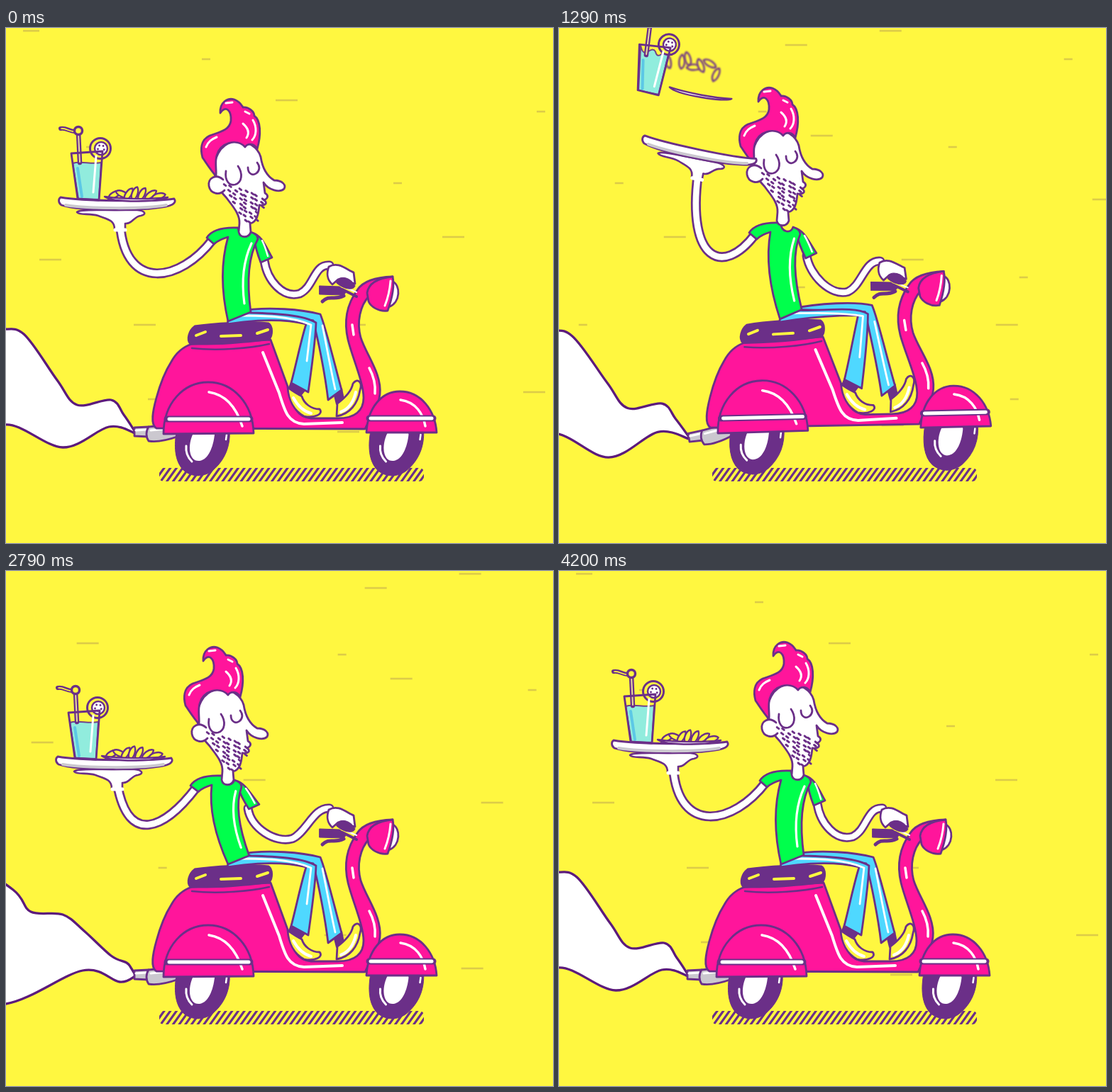
An HTML page with a canvas that plays this animation: 771x727 px, repeating every 4.23 s.

```html
<!DOCTYPE html>
<html lang="en">
<head>
<meta charset="utf-8">
<title>Scooter delivery</title>
<style>
html, body { margin: 0; width: 100%; height: 100%; overflow: hidden; background: #fff740; }
canvas { display: block; }
</style>
</head>
<body>
<canvas id="c" width="771" height="727"></canvas>
<script>
const ctx = document.getElementById('c').getContext('2d');
const YELLOW = '#fff740', INK = '#6b2f88', PINK = '#ff159b', GREEN = '#00ff4c',
  BLUE = '#4fd8ff', DRINK = '#86ecef', GREY = '#cbc8cf', WHITE = '#fff';
const STEP = 30, FRAMES = 141, RAD = Math.PI / 180;

// Traces an absolute M/L/C/Z path, optionally bending its points.
function trace(d, map) {
  const tok = d.match(/[MLCZ]|-?[\d.]+/g);
  let i = 0, cmd = '';
  const pt = () => {
    const x = +tok[i++], y = +tok[i++];
    return map ? map(x, y) : [x, y];
  };
  ctx.beginPath();
  while (i < tok.length) {
    if (/[A-Z]/.test(tok[i])) cmd = tok[i++];
    if (cmd === 'M') ctx.moveTo(...pt());
    else if (cmd === 'L') ctx.lineTo(...pt());
    else if (cmd === 'C') ctx.bezierCurveTo(...pt(), ...pt(), ...pt());
    else ctx.closePath();
  }
}
function line(d, color, w, map) {
  trace(d, map);
  ctx.strokeStyle = color;
  ctx.lineWidth = w;
  ctx.stroke();
}
function shape(d, fill, w = 2.8, map) {
  trace(d, map);
  ctx.fillStyle = fill;
  ctx.fill();
  if (w) { ctx.strokeStyle = INK; ctx.lineWidth = w; ctx.stroke(); }
}
function tube(d, wide, thin, map) {
  line(d, INK, wide, map);
  line(d, WHITE, thin, map);
}
function disc(x, y, r, fill, w = 2.8) {
  ctx.beginPath();
  ctx.arc(x, y, r, 0, 7);
  ctx.fillStyle = fill;
  ctx.fill();
  ctx.strokeStyle = INK;
  ctx.lineWidth = w;
  ctx.stroke();
}
function group(fn) { ctx.save(); fn(); ctx.restore(); }
function place(px, py, dx, dy, deg) {
  ctx.translate(px + dx, py + dy);
  ctx.rotate(deg * RAD);
  ctx.translate(-px, -py);
}

// Smooth value of a track of [frame, ...values] rows.
function at(keys, f) {
  const n = keys.length - 1;
  if (f <= keys[0][0]) return keys[0].slice(1);
  if (f >= keys[n][0]) return keys[n].slice(1);
  let i = 0;
  while (keys[i + 1][0] <= f) i++;
  const a = keys[i], b = keys[i + 1], p = keys[Math.max(0, i - 1)], q = keys[Math.min(n, i + 2)];
  const h = b[0] - a[0], u = (f - a[0]) / h, v = 1 - u;
  return a.slice(1).map((y, j) => {
    const k = j + 1;
    const m0 = i ? (b[k] - p[k]) / (b[0] - p[0]) : 0;
    const m1 = i + 1 < n ? (q[k] - a[k]) / (q[0] - a[0]) : 0;
    return y * (1 + 2 * u) * v * v + b[k] * (3 - 2 * u) * u * u + h * u * v * (m0 * v - m1 * u);
  });
}
function blur(keys, f) {
  const a = at(keys, f), b = at(keys, f - 1);
  const r = Math.min(1.5, (Math.hypot(a[0] - b[0], a[1] - b[1]) - 3) * .3);
  if (r > .2) ctx.filter = `blur(${r.toFixed(2)}px)`;
}

const RIDE = [[26,0,0],[29,-3,0],[32,-1,-2],[35,1.2,-11],[39,-.6,-5],[43,-1.2,-1],[47,-.3,0],[51,0,0]];
const HEAD = [[26,0,0],[30,3,5],[36,-6,8],[43,-21,-16],[48,-20,-24],[55,-4,-4],[61,2.5,6],[68,-2,2],[80,-16,2],[93,-24,7],[102,-10,3],[110,0,0]];
const CHEST = [[26,0,0],[30,2,4],[36,-5,6],[43,-15,-7],[48,-15,-11],[55,-3,-2],[61,3.5,4],[68,-2,3],[80,-16,3],[93,-23,7],[102,-9,3],[110,0,0]];
const TRAY = [[26,0,0,0],[31,0,12,-2],[37,24,-40,8],[43,41,-72,11],[49,46,-84,8],[55,47,-76,4],[61,46,-65,2.5],[66,44,-48,1],[74,30,-30,0],[84,4,10,0],[93,-4,23,0],[102,-2,10,0],[110,0,0,0]];
const GLASS = [[32,0,0,0],[38,-20,-50,2],[43,-33,-71,-1],[48,-33,-85,-6],[55,-16,-45,2],[61,-3,2,3],[65,0,0,0]];
const PLATE = [[32,0,0,0],[38,-14,-55,4],[43,-26,-80,-1],[49,-26,-95,-8],[55,-18,-50,-16],[61,-7,-7,-13],[65,0,0,0]];

// Wind streaks: x, y, width
const STREAKS = [[919,4,31],[786,24,31],[276,44,12],[380,102,31],[748,118,12],[822,152,31],[113,168,12],
  [546,219,12],[316,242,31],[615,295,31],[47,327,31],[213,352,12],[802,366,12],[180,419,31],[495,419,12],
  [729,514,31],[200,524,12],[922,561,31],[467,570,31]];
function streaks(f) {
  const wrap = 903, left = 24;
  group(() => {
    ctx.beginPath();
    ctx.rect(left, 0, 771, 727);
    ctx.clip();
    ctx.fillStyle = '#dccb48';
    for (const [x0, y, w] of STREAKS) {
      const x = x0 - 31.15 * (f % 28) - left + w;
      ctx.fillRect((x % wrap + wrap) % wrap + left - w, y - 1.3, w, 2.6);
    }
  });
}

// Smoke features travel left with age.
const RISE = [[-3,179,566],[0,176,560],[5,166,546],[10,143,533],[14,110,508],[17,92,497],[19,72,497],[24,45,470],[28,10,450],[33,-60,420]];
const CREST = [[-3,177,563],[0,170,553],[3,152,545],[5,148,525],[10,120,515],[14,80,485],[17,60,458],[19,25,432],[24,-12,412],[28,-70,400]];
const DIP = [[-3,174,558],[0,148,543],[3,118,537],[5,100,532],[10,75,511],[14,35,481],[17,28,457],[19,-10,425],[24,-60,400]];
const NOTCH = [[10,178,571],[12,172,570],[14,145,563],[19,115,562],[23,108,564],[26,30,577],[28,-2,560],[34,-60,590]];
const BULGE = [[6,178,573],[9,160,580],[12,100,589],[14,80,592],[15,68,598],[19,45,602],[23,0,611],[28,-60,612]];
function spline(p) {
  for (let i = 0; i < p.length - 1; i++) {
    const a = p[Math.max(0, i - 1)], b = p[i], c = p[i + 1], d = p[Math.min(p.length - 1, i + 2)];
    ctx.bezierCurveTo(b[0] + (c[0] - a[0]) / 6, b[1] + (c[1] - a[1]) / 6,
      c[0] - (d[0] - b[0]) / 6, c[1] - (d[1] - b[1]) / 6, c[0], c[1]);
  }
}
function smoke(f, dx, dy) {
  const ph = f % 14, u = (ph + 8) % 14 - 3;
  const top = [[182, 570]], low = [[182, 572]];
  for (let k = 0; k < 3; k++) {
    for (const key of [RISE, CREST, DIP]) {
      const age = u + 14 * k;
      if (age <= key[key.length - 1][0]) top.push(at(key, age));
    }
    for (const key of [NOTCH, BULGE]) {
      const age = ph + 14 * k;
      if (age >= key[0][0] && age <= key[key.length - 1][0]) low.push(at(key, age));
    }
  }
  top.push([-110, 395]);
  low.push([-110, 600]);
  low.reverse();
  group(() => {
    ctx.translate(dx, dy);
    ctx.beginPath();
    ctx.moveTo(...low[0]);
    spline(low);
    ctx.lineTo(...top[0]);
    spline(top);
    ctx.fillStyle = WHITE;
    ctx.fill();
    ctx.strokeStyle = '#5c1b7c';
    ctx.lineWidth = 3.3;
    ctx.stroke();
  });
}

function ground() {
  group(() => {
    ctx.beginPath();
    ctx.roundRect(216, 621, 373, 19, 6);
    ctx.clip();
    for (let x = 200; x < 590; x += 8.7) line(`M${x} 641L${x + 15} 620`, INK, 3.2);
  });
}

function wheel(dx) {
  group(() => {
    ctx.translate(dx, 0);
    shape('M241 566C236 590 238 612 250 624C262 635 280 634 292 624C307 611 317 592 315 566Z', INK, 1);
    shape('M264 572C274 562 294 566 294 574C292 592 285 609 273 611C258 613 255 590 264 572Z', WHITE, 0);
    line('M254 590C253 599 256 606 262 612', WHITE, 3);
    line('M311 574L310 581', WHITE, 2.5);
  });
}

function scooter(rot) {
  group(() => {
    place(242, 574, 0, 0, Math.max(-9, rot * 6.5));
    shape('M181 564L201 563L201 577L181 576Z', GREY);
    line('M183 568L199 567', WHITE, 3);
    shape('M201 563L230 560L244 576C230 581 212 585 201 583C197 577 197 569 201 563Z', GREY);
    line('M204 568L224 566', WHITE, 3);
  });
  wheel(0);
  wheel(273.5);
  shape('M545 358C556 362 557 388 539 394Z', WHITE);
  shape('M212 565C203 560 207 540 212 522C218 500 226 482 233 471C240 458 250 450 262 446L373 440L397 506C404 535 410 549 430 551L468 551C492 551 504 540 504 522C504 500 488 465 482 440C475 410 482 388 495 370C503 357 520 352 545 351L512 378C499 392 494 415 500 437C508 462 530 488 527 517C526 527 522 535 518 541L506 566Z', PINK);
  line('M262 452C300 456 345 452 371 446', INK, 2.5);
  line('M362 458L385 515C393 542 398 558 420 559L474 557', WHITE, 4);
  line('M488 419L490 433M512 480C519 493 521 505 520 516', WHITE, 3.5);
  shape('M222 573C222 530 250 500 285 500C320 500 348 530 349 572Z', PINK);
  line('M286 514C312 518 326 540 333 562', WHITE, 3.5);
  line('M227 552L344 552', INK, 9);
  line('M230 552L342 552', WHITE, 5);
  shape('M508 571C510 535 530 513 555 513C585 513 605 540 607 571Z', PINK);
  line('M556 525C578 528 588 545 591 562', WHITE, 3.5);
  line('M512 551L602 551', INK, 9);
  line('M514 551L600 551', WHITE, 5);
  shape('M266 421C290 417 345 414 370 417C376 421 376 434 371 439C345 444 290 447 260 446C254 440 258 427 266 421Z', INK);
  line('M268 434L281 429M303 435L331 434M354 431L369 426', YELLOW, 4);
  shape('M509 374C511 360 525 353 545 351C548 365 543 385 538 399C525 401 514 393 511 386Z', PINK);
  line('M542 357C541 370 538 382 534 392', WHITE, 3);
}

function legs(lift) {
  const map = (x, y) => [x, y < 425 && x > 400 ? y - lift : y];
  shape('M463 519L473 509L476 524L466 531Z', INK, 2);
  shape('M466 548L467 530C478 522 487 512 489 502C495 493 503 500 499 511C496 530 485 545 466 548Z', YELLOW);
  line('M472 542C483 538 490 527 493 514', WHITE, 4);
  shape('M404 495L398 510L416 518L424 508Z', INK, 2);
  shape('M397 507C405 514 412 517 417 520C420 530 430 538 442 538C448 545 435 551 420 548C406 540 398 525 397 507Z', YELLOW);
  line('M405 522C411 533 419 541 430 544', WHITE, 4);
  shape('M326 400C370 392 420 398 443 404C450 420 462 470 473 511L454 525C450 490 440 440 433 413Z', BLUE, 2.8, map);
  line('M446 420C452 450 458 483 464 510', WHITE, 2.8);
  shape('M312 418C313 405 325 399 345 402C380 403 420 405 437 416C436 445 430 485 426 514L402 501C410 470 416 440 423 418C390 410 360 412 335 415Z', BLUE, 2.8, map);
  line('M328 406C360 406 400 406 430 419L424 470', WHITE, 2.8, map);
}

function grip() {
  shape('M442 364L470 365L480 372L476 377L442 376Z', INK, 1);
  line('M446 386C456 376 462 385 476 378', INK, 5);
  line('M474 369L494 379', INK, 4);
  line('M480 367L494 373', WHITE, 2);
  shape('M455 337C468 329 480 341 490 345L492 361L468 355L460 362C452 355 452 345 455 337Z', WHITE);
  shape('M466 356C472 349 486 352 492 364C490 371 476 369 466 360Z', INK, 1);
}

const rows = [];
for (let y = 222, r = 0; y < 274; y += 6.2, r++) {
  const l = 307 + (y - 222) * .58, right = Math.min(361 - Math.max(0, y - 250) * .4, 320 + (y - 222) * 3.2);
  for (let x = l + (r % 2) * 4; x < right; x += 7.6) rows.push([x + Math.sin(x * 7 + r) * 1.6, y + Math.cos(x * 3) * 1.6]);
}
function head() {
  shape('M294 206C292 185 300 165 322 160C340 158 355 168 359 182C361 195 366 208 378 215C390 215 395 222 392 227C386 233 370 229 363 218L365 233C370 236 370 240 364 243C369 247 366 251 357 250C356 262 354 274 344 276L345 288C342 297 330 297 328 288L329 276C330 262 318 250 311 240C305 234 298 226 294 206Z', WHITE);
  shape('M306 214C296 205 284 212 286 223C288 234 301 237 308 229', WHITE);
  for (const [x, y] of rows) line(`M${x} ${y}L${x + 2.6} ${y + 2}`, INK, 3);
  line('M310 202C308 216 315 223 323 221C333 218 334 205 327 195M341 197C341 206 348 209 353 205C358 201 358 195 354 190', INK, 2.8);
  shape('M296 209C288 200 282 190 277 183C274 172 274 158 287 152C300 147 315 145 317 131C318 117 310 108 302 120C301 105 312 98 322 101C330 104 332 109 334 112C342 111 350 118 350 124C359 130 360 150 354 171C350 163 341 162 337 168C325 155 302 162 297 180C294 190 297 200 296 209Z', PINK);
  line('M282 168C285 160 290 157 297 154M348 130C354 140 353 152 347 158M334 135C342 142 343 149 339 155M310 106L319 105M337 118L343 121', WHITE, 3);
}

function shirt(map) {
  shape('M347 289C360 292 366 308 375 324L359 331C354 318 351 308 351 300Z', GREEN, 2.8, map);
  line('M361 300C365 308 367 315 369 322', WHITE, 2.5, map);
  shape('M283 296C290 285 305 281 327 282C329 297 342 297 345 288C351 290 355 294 355 298C344 318 338 350 345 401L313 414C303 370 303 330 313 295C306 297 299 300 293 305Z', GREEN, 2.8, map);
  line('M346 304C334 330 332 360 336 389', WHITE, 3.2, map);
}

function hand() {
  shape('M153 284C153 271 143 270 130 265C118 261 104 265 100 260C104 256 125 257 140 257L185 257C196 258 199 263 190 265C180 266 178 277 168 276L168 284', WHITE, 2.6);
  line('M154 285L168 285', WHITE, 5);
}
function tray() {
  shape('M77 239C105 244 205 246 237 241C240 245 237 249 230 251C200 259 105 259 78 250C73 246 74 241 77 239Z', WHITE);
  line('M84 250C115 255 195 256 226 250', GREY, 4);
}

function glass(splash) {
  ctx.globalAlpha = .9;
  shape(splash > .05
    ? `M94 ${191 - 13 * splash}C102 ${191 + 9 * splash} 108 ${190 - 16 * splash} 116 ${191 - 8 * splash}C122 ${191 + 6 * splash} 128 ${190 - 14 * splash} 135 ${190 - 12 * splash}L131 242L102 241Z`
    : 'M94 191C105 187 120 193 134 190L131 242L102 241Z', DRINK, 2);
  ctx.globalAlpha = 1;
  line('M101 198L107 238', '#5cc8e6', 4);
  line('M77 142C85 140 90 147 98 146', INK, 6);
  line('M78 142C85 141 90 147 97 146', YELLOW, 1.6);
  line('M102 148L104 190', INK, 6.5);
  line('M102 149L104 189', '#e8d9a0', 2);
  disc(102, 145, 5.5, YELLOW, 3.5);
  disc(133, 170, 14.5, YELLOW, 3);
  disc(134, 170, 9, WHITE, 2.5);
  for (let i = 0; i < 5; i++) {
    const a = i * 1.257 + .4;
    disc(134 + 4.6 * Math.cos(a), 170 + 4.6 * Math.sin(a), .7, INK, 1.5);
  }
  line('M92 177L136 174L131 243L101 241Z', INK, 2.8);
  line('M127 181L123 232', WHITE, 3);
}

const FRIES = [[153,236,-25],[164,235,30],[173,235,-52],[182,234,-66],[192,235,-58],[204,236,-32],[215,238,-10]];
function fries(f, tr) {
  FRIES.forEach(([x, y, deg], i) => {
    const first = i === 0;
    const from = first ? 33 : 35, to = first ? 76 : 83 + i % 3;
    const u = Math.min(1, Math.max(0, (f - from) / (to - from))), up = 4 * u * (1 - u);
    group(() => {
      if (up > 0) ctx.filter = 'blur(.8px)';
      ctx.translate(-42 * Math.min(1, up * 1.5), -up * (first ? 163 : 200 + i % 3 * 14));
      place(157, 247, ...tr);
      place(x, y, 0, 0, deg + u * 360 * (i % 2 ? 1 : -1));
      shape(`M${x - 10} ${y + 1}C${x - 7} ${y - 6} ${x + 7} ${y - 6} ${x + 10} ${y - 1}C${x + 6} ${y + 4} ${x - 5} ${y + 5} ${x - 10} ${y + 1}Z`, YELLOW, 2.4);
    });
  });
}

function carried(keys, f, tr, px, py, fn) {
  const [ox, oy, r] = at(keys, f);
  group(() => {
    blur(keys, f);
    ctx.translate(ox, oy);
    place(157, 247, ...tr);
    place(px, py, 0, 0, r);
    fn();
  });
}

function stone(f) {
  if (f < 20 || f > 45) return;
  group(() => {
    ctx.translate(-40 * (f - 26), 0);
    shape('M585 633C585 621 594 611 602 611C612 611 619 619 622 627C618 636 602 638 585 633Z', '#cfd0cb', 0);
    line('M585 633C585 621 594 611 602 611C612 611 619 619 622 627C618 636 602 638 585 633Z', '#45483b', 3);
    line('M601 616C607 616 611 620 613 625', WHITE, 4);
    line('M593 624C596 621 600 622 601 625Z', '#45483b', 2);
  });
}

function render(f) {
  const [rot, lift] = at(RIDE, f), slide = -rot * 1.6;
  const hd = at(HEAD, f), ch = at(CHEST, f), tr = at(TRAY, f);
  const cos = Math.cos(rot * RAD), sin = Math.sin(rot * RAD);
  const onRide = (x, y) => {
    const a = x - 224, b = y - 573;
    return [224 + slide + a * cos - b * sin, 573 + lift + a * sin + b * cos];
  };
  const seat = onRide(328, 410);
  const bend = (x, y) => {
    const w = Math.min(1, Math.max(0, (412 - y) / 112));
    return [x + ch[0] * w + (seat[0] - 328) * (1 - w), y + ch[1] * w + (seat[1] - 410) * (1 - w)];
  };

  ctx.fillStyle = YELLOW;
  ctx.fillRect(0, 0, 771, 727);
  streaks(f);
  const pipe = onRide(181, 570);
  smoke(f, pipe[0] - 181, pipe[1] - 570 - 61 * Math.sin(Math.max(-9, rot * 6.5) * RAD));
  ground();
  group(() => {
    place(224, 573, slide, lift, rot);
    scooter(rot);
    legs(Math.max(0, -ch[1]));
  });
  stone(f);

  // Far arm from sleeve to tray hand
  const ta = tr[2] * RAD;
  const hx = 157 + tr[0] + 4 * Math.cos(ta) - 32 * Math.sin(ta);
  const hy = 247 + tr[1] + 4 * Math.sin(ta) + 32 * Math.cos(ta);
  const ax = 291 + ch[0], ay = 299 + ch[1];
  tube(`M${ax} ${ay}C${ax - 45} ${ay + 59} ${hx + 8 + tr[1] * .33} ${hy + 94 - tr[1] * .38} ${hx} ${hy}`, 14, 8.6);

  const [ex, ey] = onRide(456, 335);
  const sx = 364 + ch[0], sy = 328 + ch[1], mx = 414 + ch[0] * .45, my = 375 + ch[1] * .4;
  tube(`M${sx} ${sy}C${sx + 4} ${sy + 28} ${mx - 24} ${my + 7} ${mx} ${my}C${mx + 20} ${my - 9} ${ex - 22} ${ey - 2} ${ex} ${ey}`, 13, 7.8);
  group(() => { place(224, 573, slide, lift, rot); grip(); });
  shirt(bend);

  group(() => {
    blur(HEAD, f);
    ctx.translate(hd[0], hd[1]);
    head();
  });
  group(() => {
    blur(TRAY, f);
    place(157, 247, ...tr);
    hand();
    tray();
  });
  fries(f, tr);
  carried(PLATE, f, tr, 183, 241, () =>
    shape('M139 238C165 242 205 242 228 239C220 246 150 247 139 238Z', WHITE, 2.4));
  const splash = at([[32, 0], [38, .8], [43, 1], [61, 1], [74, 0]], f)[0];
  carried(GLASS, f, tr, 117, 243, () => glass(splash));
}

ctx.lineCap = ctx.lineJoin = 'round';
let shown = -1;
function tick() {
  const f = Math.floor(performance.now() / STEP) % FRAMES;
  if (f !== shown) render(shown = f);
  requestAnimationFrame(tick);
}
tick();
</script>
</body>
</html>
```
